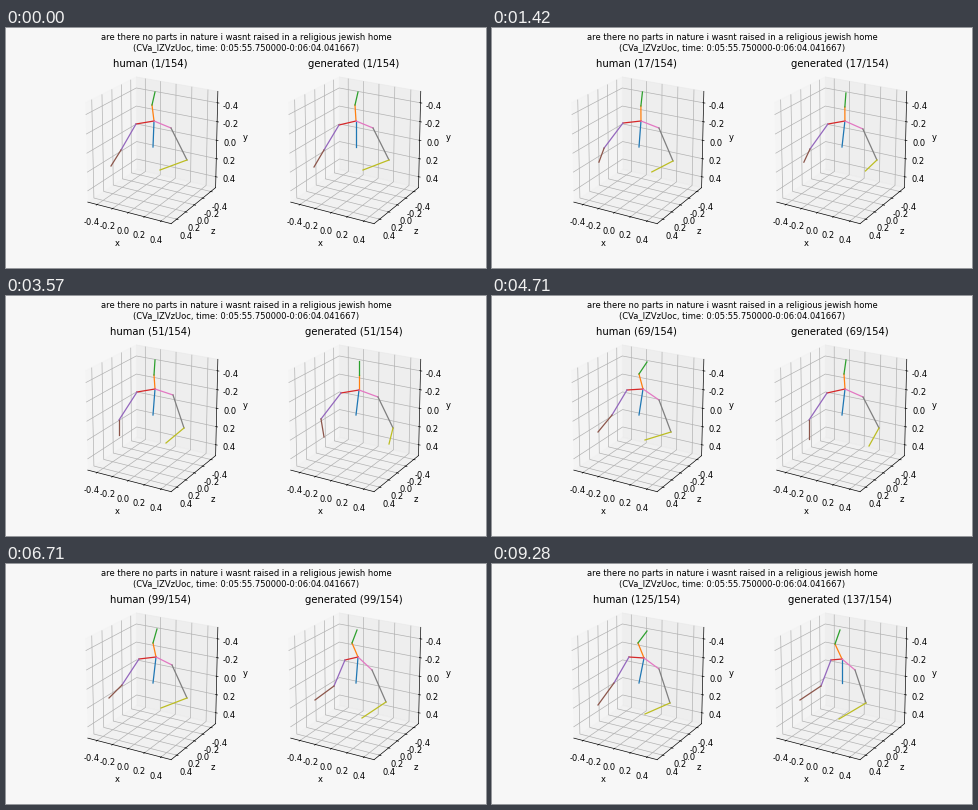
Write a matplotlib script that moves like this. It is 480 by 240 pixels and loops after 9420 ms.

```python
import math

import matplotlib.pyplot as plt
import numpy as np
from matplotlib.animation import FuncAnimation

W, H, DPI = 480, 240, 60
STEPS, LOOP_MS = 66, 9420
TOTAL, HUMAN_END = 154, 125
PAPER = "#f7f7f7"
HALF = 0.5 * 25 / 24
TICKS = [-0.4, -0.2, 0.0, 0.2, 0.4]
NAMES = [f"{t:.1f}" for t in TICKS]

# Joint tracks on the stage: x and y at each key time.
HUMAN_KEYS = [1, 19, 51, 69, 99, 116, 125]
HUMAN = {
    "head": ([149, 150.5, 149, 155, 151, 152, 155], [64, 64, 64, 66, 65, 66, 67]),
    "chin": ([146, 149, 148, 147, 147, 146, 146], [77, 78, 79, 78, 79, 79, 79]),
    "neck": ([148, 149, 149, 151, 150, 151, 152], [93, 93, 93, 93, 93, 94, 94]),
    "r_sho": ([130, 131, 131, 135, 133, 135, 137], [96, 95, 96, 94, 95, 94, 93]),
    "r_elb": ([115, 112, 113, 120, 116, 120, 122], [122, 120, 124, 119, 121, 120, 119]),
    "r_wri": ([105, 107, 113, 106, 103, 107, 106], [138, 134, 139, 136, 134, 136, 141]),
    "l_sho": ([165, 167, 167, 167, 166, 167, 167], [100, 100, 99, 104, 101, 104, 105]),
    "l_elb": ([181, 181, 178, 179, 181, 180, 178], [132, 133, 132, 136, 134, 136, 139]),
    "l_wri": ([154, 160, 160, 153, 155, 155, 153], [142, 144, 147, 144, 144, 146, 150]),
}
MODEL_KEYS = [1, 19, 51, 69, 99, 116, 137]
MODEL = {
    "head": ([352, 354, 353, 354, 351, 348, 348], [64, 65, 65, 64, 66, 67, 66]),
    "chin": ([349, 353, 353, 352, 346, 342, 343], [77, 79, 79, 78, 79, 80, 80]),
    "neck": ([350, 353, 353, 353, 352, 350, 350], [93, 93, 94, 93, 93, 95, 95]),
    "r_sho": ([333, 336, 335, 335, 339, 339, 339], [97, 96, 97, 97, 96, 96, 96]),
    "r_elb": ([318, 318, 315, 317, 328, 330, 329], [122, 121, 123, 124, 122, 123, 122]),
    "r_wri": ([308, 312, 318, 317, 309, 313, 308], [139, 134, 141, 143, 136, 136, 136]),
    "l_sho": ([367, 371, 372, 371, 366, 363, 363], [100, 101, 101, 101, 106, 106, 106]),
    "l_elb": ([383, 385, 387, 387, 380, 375, 374], [132, 132, 132, 132, 138, 139, 139]),
    "l_wri": ([357, 374, 383, 377, 356, 350, 347], [142, 143, 148, 150, 154, 156, 155]),
}
BONES = [
    ("neck", "hip"), ("neck", "chin"), ("chin", "head"),
    ("neck", "r_sho"), ("r_sho", "r_elb"), ("r_elb", "r_wri"),
    ("neck", "l_sho"), ("l_sho", "l_elb"), ("l_elb", "l_wri"),
]

fig = plt.figure(figsize=(W / DPI, H / DPI), dpi=DPI, facecolor=PAPER)
fig.suptitle(
    "are there no parts in nature i wasnt raised in a religious jewish home\n"
    "(CVa_IZVzUoc, time: 0:05:55.750000-0:06:04.041667)",
    fontsize=10,
)


def add_room(slot):
    ax = fig.add_subplot(1, 2, slot, projection="3d")
    ax.apply_aspect = lambda position=None: None  # fill the slot, not a square
    ax.set_facecolor("none")
    ax.set_box_aspect((1, 1, 1), zoom=math.sqrt(3) / 1.8294640721620434)
    ax.view_init(elev=20, azim=-60)
    # Depth and height run downwards, so their labels are reversed.
    ax.set_xticks(TICKS, labels=NAMES)
    ax.set_yticks(TICKS, labels=NAMES[::-1])
    ax.set_zticks(TICKS, labels=NAMES[::-1])
    ax.set_xlim(-HALF, HALF)
    ax.set_ylim(-HALF, HALF)
    ax.set_zlim(-HALF, HALF)
    ax.set_xlabel("x")
    ax.set_ylabel("z")
    ax.set_zlabel("y")


add_room(1)
add_room(2)

stage = fig.add_axes([0, 0, 1, 1], zorder=5)
stage.set_xlim(0, W)
stage.set_ylim(H, 0)
stage.axis("off")


def ease(n, keys, values):
    k = int(np.clip(np.searchsorted(keys, n, side="right") - 1, 0, len(keys) - 2))
    u = np.clip((n - keys[k]) / (keys[k + 1] - keys[k]), 0, 1)
    u = u * u * (3 - 2 * u)
    return values[k] + (values[k + 1] - values[k]) * u


class Figure3:
    def __init__(self, label, x, keys, tracks, hip, last):
        self.label, self.keys, self.tracks = label, keys, tracks
        self.hip, self.last = hip, last
        self.title = stage.text(x, 39, "", fontsize=12, ha="center", va="baseline")
        self.lines = [
            stage.plot([], [], color=f"C{i}", lw=1.5)[0] for i in range(len(BONES))
        ]

    def pose(self, n):
        n = min(n, self.last)
        self.title.set_text(f"{self.label} ({n}/{TOTAL})")
        joints = {
            name: (ease(n, self.keys, xs), ease(n, self.keys, ys))
            for name, (xs, ys) in self.tracks.items()
        }
        joints["hip"] = self.hip
        for line, (a, b) in zip(self.lines, BONES):
            line.set_data(*zip(joints[a], joints[b]))


people = [
    Figure3("human", 144.5, HUMAN_KEYS, HUMAN, (147, 119), HUMAN_END),
    Figure3("generated", 347.5, MODEL_KEYS, MODEL, (350, 119), TOTAL),
]


def draw(i):
    # 15 poses a second shown at 7 pictures a second.
    n = max(1, math.floor(i * 15 / 7 - 1.64))
    for person in people:
        person.pose(n)
    return []


anim = FuncAnimation(
    fig, draw, frames=STEPS, interval=LOOP_MS / STEPS, repeat=True, repeat_delay=0
)
plt.show()
```
